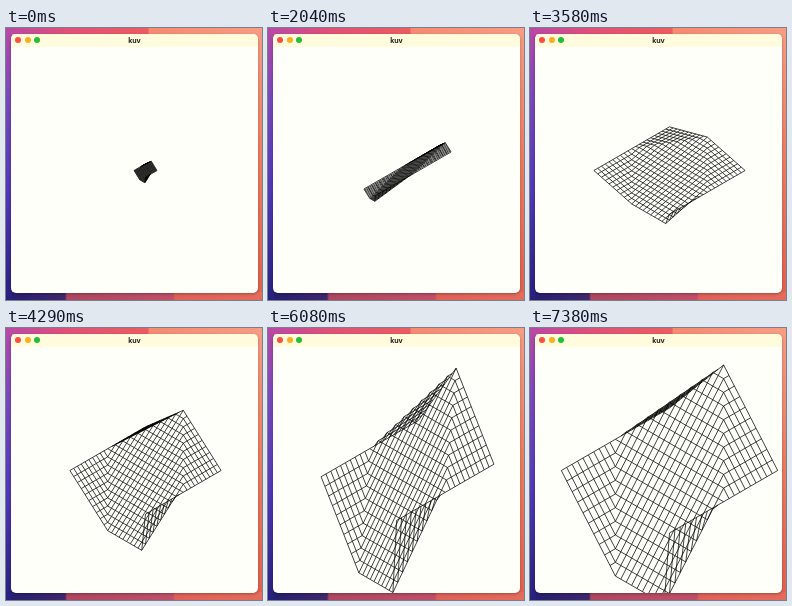
An HTML page with a canvas that plays this animation: 256x272 px, repeating every 7420 ms.

```html
<!DOCTYPE html>
<html lang="en">
<head>
<meta charset="utf-8">
<title>Wireframe</title>
<style>
  html, body { margin: 0; width: 100%; height: 100%; overflow: hidden; }
  .desktop {
    position: relative; width: 256px; height: 272px; overflow: hidden;
    background:
      linear-gradient(90deg, #b848a8, #e05078 60px, #ec5c60 142px, #f58a70 143px, #f89c84) 0 0 / 256px 6px no-repeat,
      linear-gradient(#b848a8, #7a48bc 25%, #5038b8 60%, #28207c) 0 0 / 6px 272px no-repeat,
      linear-gradient(90deg, #241e70, #40286c 59px, #b04660 61px, #c05068 167px, #e06058 169px, #e46c5c) 0 264px / 256px 8px no-repeat,
      linear-gradient(#f89c84, #ec7c60 50%, #e06050);
  }
  .window {
    position: absolute; left: 5px; top: 6px; width: 247px; height: 259px;
    border-radius: 5px; overflow: hidden; background: #fffffa;
    box-shadow: 0 1px 3px rgba(0, 0, 0, .3);
  }
  .bar {
    height: 13px; background: #fffbdc;
    font: bold 7px/13px Inter, Roboto, sans-serif; text-align: center; color: #222;
  }
  .dot { position: absolute; top: 3px; width: 6px; height: 6px; border-radius: 50%; }
  canvas { position: absolute; left: 0; top: 0; width: 247px; height: 259px; }
</style>
</head>
<body>
<div class="desktop">
  <div class="window">
    <div class="bar">kuv</div>
    <i class="dot" style="left:4px;background:#f9503f"></i>
    <i class="dot" style="left:13.5px;background:#fbae22"></i>
    <i class="dot" style="left:23px;background:#27bd35"></i>
    <canvas></canvas>
  </div>
</div>
<script>
const LOOP = 7420, TICK = 1000 / 24;
const LAST = 20, MID = LAST / 2, TILT = Math.tan(Math.PI / 6);
const CENTER = { x: 134.5, y: 136.5 };

// Cell sizes over time: [ms, pixels]
const ALONG = [[640, 0.575], [1665, 3.78], [5700, 3.78], [6215, 5.41]];
const ACROSS = [[2260, 0.575], [3290, 3.78], [6830, 3.78], [7345, 5.41]];
const LIFT = [[3385, 0.6], [5300, 7.43]];

const canvas = document.querySelector('canvas');
const ctx = canvas.getContext('2d');
const ratio = window.devicePixelRatio || 1;
canvas.width = 247 * ratio;
canvas.height = 259 * ratio;
ctx.scale(ratio, ratio);

function valueAt(track, t) {
  if (t <= track[0][0]) return track[0][1];
  for (let i = 1; i < track.length; i++) {
    const [t0, v0] = track[i - 1], [t1, v1] = track[i];
    if (t < t1) return v0 + (v1 - v0) * (t - t0) / (t1 - t0);
  }
  return track[track.length - 1][1];
}

// Sloping sheet with creased corners; the last row falls back to zero.
function height(a, b) {
  const top = Math.min(b, LAST - b);
  const bottom = b === LAST ? 0 : -b;
  return Math.max(bottom, Math.min(top, a - MID));
}

function draw(t) {
  const along = valueAt(ALONG, t), across = valueAt(ACROSS, t), lift = valueAt(LIFT, t);
  const project = (a, b) => {
    const u = (a - MID) * along, v = (b - MID) * across;
    return [CENTER.x + u + v, CENTER.y + (v - u) * TILT - height(a, b) * lift];
  };
  const trace = point => {
    for (let i = 0; i <= LAST; i++) {
      const [x, y] = point(i);
      if (i) ctx.lineTo(x, y); else ctx.moveTo(x, y);
    }
  };

  ctx.clearRect(0, 0, 247, 259);
  ctx.lineWidth = 0.75;
  ctx.lineJoin = 'bevel';
  ctx.strokeStyle = '#000';
  ctx.beginPath();
  for (let k = 0; k <= LAST; k++) {
    trace(i => project(i, k));
    trace(i => project(k, i));
  }
  ctx.stroke();
}

const start = performance.now();
function frame() {
  const t = (performance.now() - start) % LOOP;
  draw(Math.floor((t + 2) / TICK) * TICK);
  requestAnimationFrame(frame);
}
frame();
</script>
</body>
</html>
```
